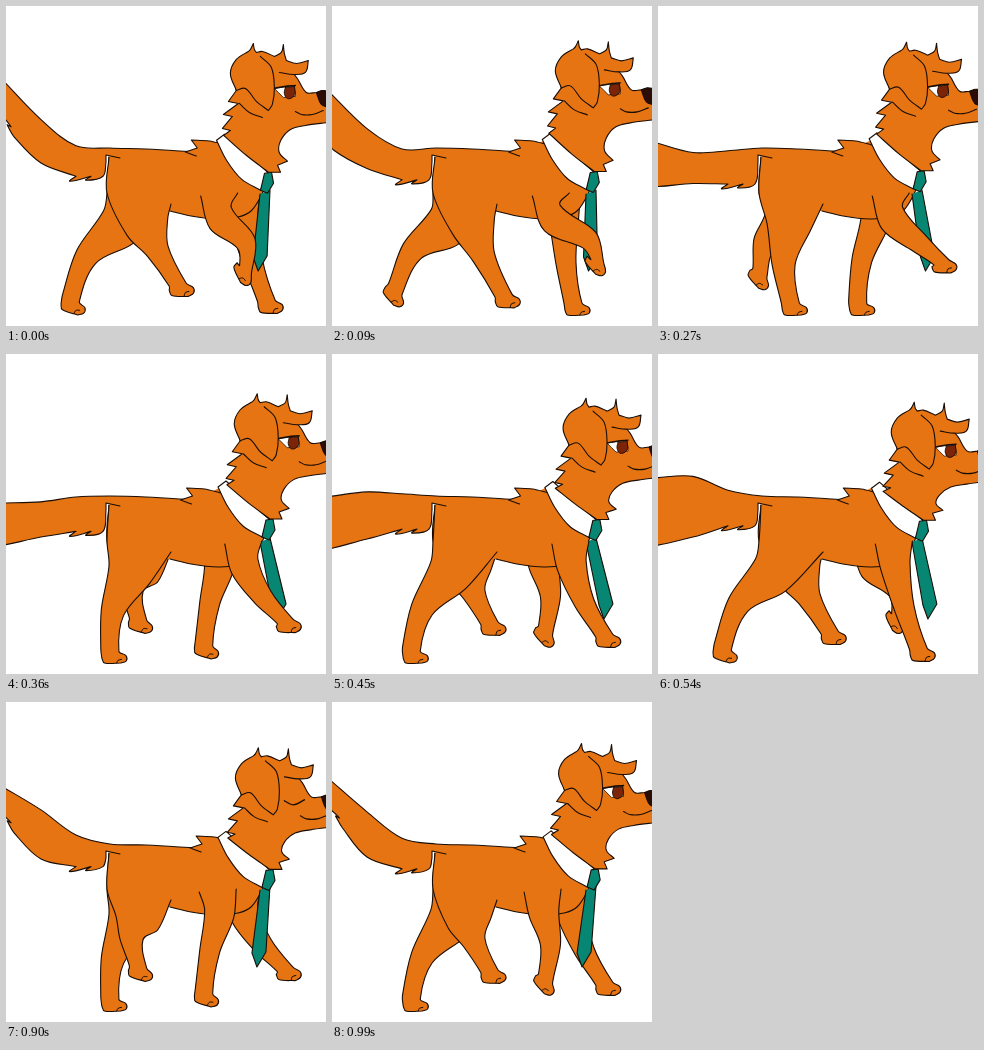
Recreate the animation shown at these times as an HTML page with a canvas. Size 320 px wide and 320 px high, loop 1.08 s.

```html
<!DOCTYPE html>
<html lang="en">
<head>
<meta charset="utf-8">
<title>Walking dog</title>
<style>
html, body { margin: 0; width: 100%; height: 100%; overflow: hidden; background: #fff; }
canvas { display: block; width: 320px; height: 320px; }
</style>
</head>
<body>
<canvas id="stage"></canvas>
<script>
const FUR = '#e67412', INK = '#1a0d05', TEAL = '#078673', BROWN = '#7c2407';
const STEP = 90, COUNT = 12, GROUND = 309;

const canvas = document.getElementById('stage');
const ctx = canvas.getContext('2d');
const dpr = window.devicePixelRatio || 1;
canvas.width = canvas.height = 320 * dpr;
ctx.scale(dpr, dpr);
ctx.lineJoin = ctx.lineCap = 'round';

// Cosine over one walk cycle, highest at step `peak`; harm 2 swings twice.
const swing = (k, peak, harm = 1) => Math.cos(2 * Math.PI * harm * (k - peak) / COUNT);
const wave = (k, mean, amp, peak) => mean + amp * swing(k, peak);

// A path is smooth runs of points; " / " marks a corner.
const parse = s => s.split(' / ').map(run => run.split(' ').map(p => p.split(',').map(Number)));
const mapPath = (path, fn) => path.map(run => run.map(fn));
const move = (path, [dx, dy]) => mapPath(path, ([x, y]) => [x + dx, y + dy]);

const torso = parse('104,150 / 110,143 / 190,146 / 215,133 / 262,165 / 262,172 256,188 245,205 232,211 / 212,213 / 185,210 164,205 / 125,205 / 104,188');
const belly = parse('164,205 185,210 212,213 232,211 245,205 256,188 262,172');
const tuft = parse('222,139 / 206,135 188,134 / 194,142 / 182,146 / 193,150');
const collar = parse('211,135 / 219,129 / 262,167 / 255,185 / 236,174 221,155 211,135');
const knot = parse('259,168 / 266,167 / 268,178 / 262,188 / 255,185 / 259,168');
const head = parse('284,62 293,73 302,87 312,87 / 324,86 / 324,117 / 301,120 286,124 276,135 274,147 282,156 / 272,160 / 275,167 / 263,167 / 241,150 219,130 / 226,125 / 218,123 / 228,111 / 219,109 / 234,98 / 224,96 / 232,85 / 229,72 / 245,65');
const hair = parse('232,85 226,68 232,54 244,46 / 246,44 249,38 / 250,44 252,47 / 258,46 270,51 / 277,47 279,39 / 280,48 282,55 / 292,58 304,55 / 301,67 289,69 275,67');
const ear = parse('256,51 267,62 270,82 268,99 264,105 / 252,96 241,83 232,85');
const cheek = parse('235,98 245,107 258,112');
const mouth = parse('291,106 297,109 308,109 319,105');
const eyeWhite = parse('270,83 / 290,80 / 291,91 / 279,92 / 270,83');
const iris = parse('281,82 / 280,88 283,93 288,92 291,88 / 290,81 / 281,82');
const lid = parse('269,83 280,81 291,80');
const shutLid = parse('275,91 284,95 295,90');
const nose = parse('312,87 318,85 325,86 / 325,102 / 317,99 312,87');

// Joints run from the upper leg down to the ankle.
function hindJoints(k) {
  const s = swing(k, .5);
  return {
    top: [[103, 151], [101, 187]],
    end: [165, 198],
    joints: [
      [127 + 15 * s, 221, 22],
      [116 + 37 * s, wave(k, 248, 11, 3.5), 11.5],
      [117 + 55 * s, Math.min(296, wave(k, 284, 22, 3.7)), 8]
    ],
    tilt: swing(k, 8)
  };
}

function foreJoints(k) {
  const elbow = wave(k, 226, 14, 4.8), twist = 8 * swing(k, .8, 2);
  return {
    top: [[elbow - 20, 190]],
    end: [elbow + 17, 187],
    joints: [
      [elbow, 212, 15],
      [wave(k, 238, 29, 3.2) + twist, wave(k, 246, 12, 7.5), 10],
      [wave(k, 245, 42, 3.4) + twist, Math.min(296, wave(k, 276, 29, 7.8)), 8]
    ],
    tilt: swing(k, 0)
  };
}

function smooth(pts) {
  const dir = i => {
    const a = pts[Math.max(i - 1, 0)], b = pts[Math.min(i + 1, pts.length - 1)];
    const len = Math.hypot(b[0] - a[0], b[1] - a[1]) || 1;
    return [(b[0] - a[0]) / len, (b[1] - a[1]) / len];
  };
  for (let i = 1; i < pts.length; i++) {
    const [p, q] = [pts[i - 1], pts[i]];
    const h = Math.hypot(q[0] - p[0], q[1] - p[1]) / 3;
    const u = dir(i - 1), v = dir(i);
    ctx.bezierCurveTo(p[0] + u[0] * h, p[1] + u[1] * h, q[0] - v[0] * h, q[1] - v[1] * h, q[0], q[1]);
  }
}

function draw(path, fill, line = 1.1) {
  ctx.beginPath();
  ctx.moveTo(...path[0][0]);
  let last = path[0][0];
  path.forEach((run, i) => {
    smooth(i ? [last, ...run] : run);
    last = run[run.length - 1];
  });
  if (fill) { ctx.fillStyle = fill; ctx.fill(); }
  if (line) { ctx.strokeStyle = INK; ctx.lineWidth = line; ctx.stroke(); }
}

// Widens the joint chain to an outline and adds a paw that flattens on the ground.
function leg({ top, end, joints, tilt }) {
  const back = [], front = [];
  joints.forEach(([x, y, w], i) => {
    const a = joints[Math.max(i - 1, 0)], b = joints[Math.min(i + 1, joints.length - 1)];
    const len = Math.hypot(b[0] - a[0], b[1] - a[1]);
    const nx = -(b[1] - a[1]) / len * w, ny = (b[0] - a[0]) / len * w;
    back.push([x + nx, y + ny]);
    front.unshift([x - nx, y - ny]);
  });
  const [ax, ay] = joints[joints.length - 1];
  const angle = (18 + 62 * Math.max(0, tilt) ** 2) * Math.PI / 180;
  const c = Math.cos(angle), s = Math.sin(angle);
  const paw = (u, v) => [ax + c * u - s * v, Math.min(GROUND, ay + s * u + c * v)];
  draw([
    [...top, ...back, paw(-4, 10)],
    [paw(0, 14), paw(16, 10)],
    [paw(20, 5), paw(18, 0), paw(10, -2), ...front.slice(1), end]
  ], FUR);
  draw([[paw(12, 11), paw(12, 7), paw(15, 5)]], null, 1);
}

function tail(k) {
  const curl = swing(k, 3.8, 2);
  const tip = wave(k, 106, 34, 4.6) + 11 * curl;
  const under = wave(k, 147, 36, 5), root = wave(k, 171, 7, 3.2);
  const notch = 5 - (under - 116) / 2;
  draw([
    [[190, 146], [140, 143], [104, 142], [70, wave(k, 138, 7, 2.5)],
      [35, wave(k, 122, 21, 3.4) + 6 * curl], [-4, tip]],
    [[-12, (tip + under) / 2], [notch, under + 5]],
    [[notch - 4, under + 3]],
    [[notch + 3, under + 15], [35, wave(k, 170, 15, 5)], [70, root]],
    [[64, root + 5], [85, root]],
    [[80, root + 4], [97, root], [100, 156]],
    [[100, 149]],
    [[114, 152]]
  ], FUR);
}

function tie(k) {
  const x = wave(k, 261, 11, 4.8);
  draw([[[254, 188]], [[x - 5, 251]], [[x, 265]], [[x + 9, 250]], [[264, 184]]], TEAL);
}

function dog(k) {
  const neck = [wave(k, 1, 1.7, 7), wave(k, -.8, 1.4, 9)];
  const skull = [wave(k, 2.8, 5.5, 7.2), wave(k, 4.8, 8.5, 7.7)];
  // The neck stretches between collar and skull.
  const place = path => mapPath(path, ([x, y]) => {
    const w = Math.max(0, Math.min(1, (160 - y) / 40));
    return [x + neck[0] + (skull[0] - neck[0]) * w, y + neck[1] + (skull[1] - neck[1]) * w];
  });

  leg(hindJoints(k + COUNT / 2));
  leg(foreJoints(k + COUNT / 2));
  draw(torso, FUR, 0);
  draw(belly);
  tie(k);
  leg(hindJoints(k));
  tail(k);
  leg(foreJoints(k));
  draw(move(tuft, [wave(k, -2.7, 5.5, 9), 0]), FUR);
  draw(move(collar, neck), '#fff');
  draw(move(knot, neck), TEAL);

  draw(place(head), FUR);
  draw(place(cheek));
  if (k === 10) {
    draw(place(shutLid), null, 1.4);
  } else {
    draw(place(eyeWhite), '#fff', .8);
    draw(place(iris), BROWN, .9);
    draw(place(lid), null, 1.4);
  }
  draw(place(nose), '#2b0d06');
  draw(place(mouth));
  draw(place(hair), FUR);
  draw(place(ear), FUR);
}

function frame() {
  ctx.fillStyle = '#fff';
  ctx.fillRect(0, 0, 320, 320);
  dog(Math.floor(performance.now() / STEP) % COUNT);
  requestAnimationFrame(frame);
}
frame();
</script>
</body>
</html>
```
